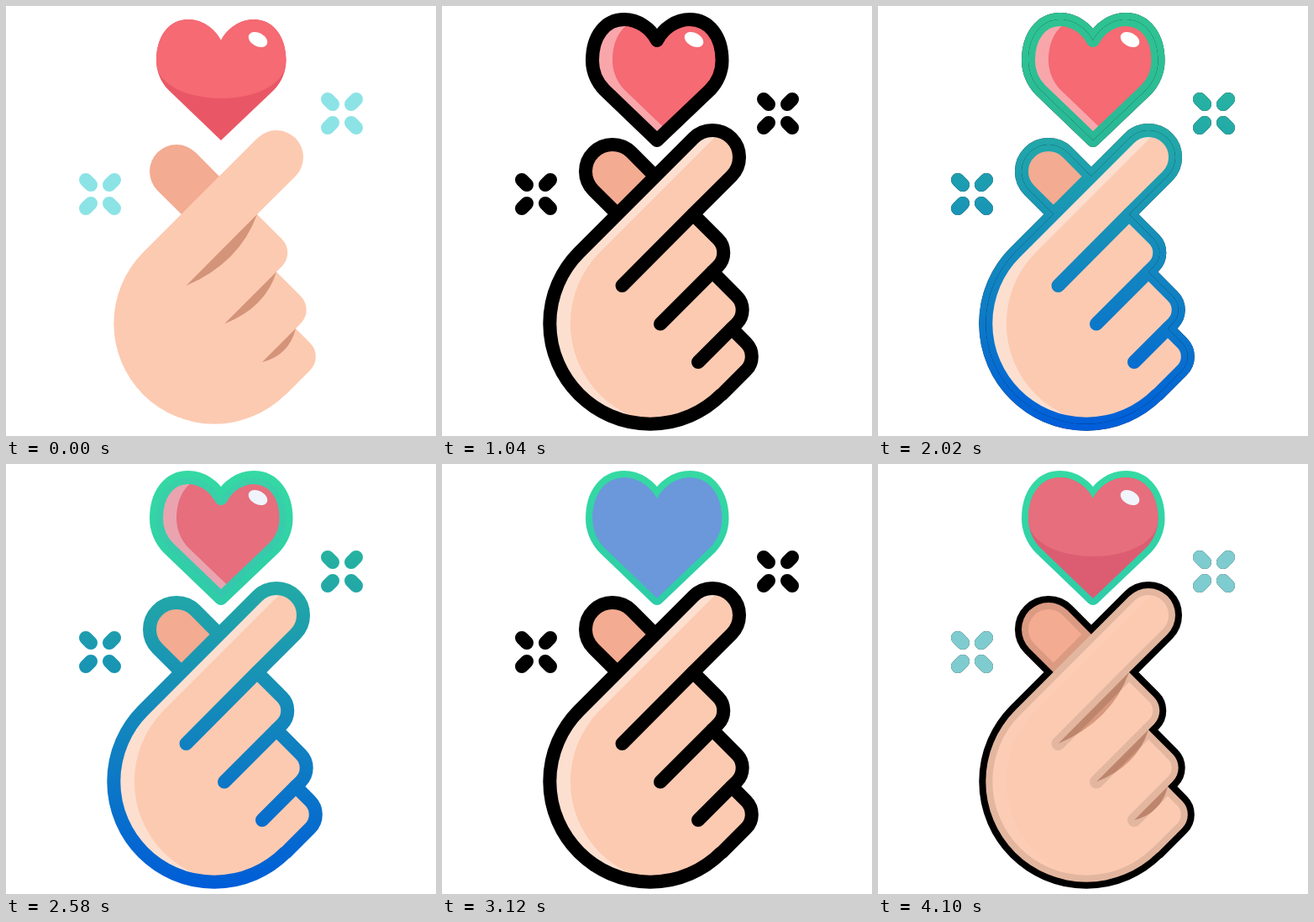
Animation of 512x512 px, one loop 4.16 s. Source, as an HTML page with a canvas:

```html
<!DOCTYPE html>
<html lang="en">
<head>
<meta charset="utf-8">
<title>Finger heart</title>
<style>
  html, body { margin: 0; width: 100%; height: 100%; overflow: hidden; background: #fff; }
  canvas { display: block; width: 512px; height: 512px; }
</style>
</head>
<body>
<canvas id="stage" width="512" height="512"></canvas>
<script>
const SIZE = 512, HOLD = 500, STEP = 60, STEPS = 9;
const PART = HOLD + STEP * STEPS;
const LINE = 16, SHINE = 24.5;
const PI = Math.PI;

const heart = new Path2D(
  'M256 160L193.5 100C184.5 91 179 78 179 65C179 36 194 16 217 16C233 16 248 26 256 41' +
  'C264 26 279 16 295 16C318 16 333.5 36 333.5 65C333.5 78 328 91 319 100Z');
const heartTop = new Path2D('M170 0H342V66H333.5C333.5 92 299 110 256 110C213 110 178.5 92 178.5 66H170Z');

// The lower end reaches under the hand.
const thumb = new Path2D();
thumb.arc(203, 197, 32, 0.75 * PI, 1.75 * PI);
thumb.lineTo(264, 213);
thumb.lineTo(219, 258);
thumb.closePath();

// Each folded finger: where its crease meets the edge, and its rounded corner.
const fingers = [
  { notch: [299, 248], corner: [344.8, 293.7], end: [214.5, 333], bend: [278, 306] },
  { notch: [322, 316.5], corner: [367.2, 361.8], end: [260, 378.5], bend: [309, 359] },
  { notch: [345, 384], corner: [378.3, 417.4], end: [305, 424], bend: [337, 416] }
];

const hand = new Path2D();
hand.arc(322, 180, 32, -0.75 * PI, 0.25 * PI);
fingers.forEach(({ notch, corner }, i) => {
  const next = i < 2 ? fingers[i + 1].notch : [332.9, 462.9];
  hand.lineTo(...notch);
  hand.arcTo(...corner, ...next, 23);
  hand.lineTo(...next);
});
hand.arc(248, 378, 119.7, 0.25 * PI, 1.25 * PI);
hand.closePath();

const creases = new Path2D(), shadows = new Path2D();
for (const { notch, end, bend } of fingers) {
  creases.moveTo(...notch);
  creases.lineTo(...end);
  shadows.moveTo(...end);
  shadows.lineTo(...notch);
  shadows.quadraticCurveTo(...bend, ...end);
}

const sparkles = new Path2D();
for (const [x, y] of [[400, 128], [112, 224]])
  for (const sx of [-1, 1])
    for (const sy of [-1, 1]) {
      sparkles.moveTo(x + 17 * sx, y + 17 * sy);
      sparkles.lineTo(x + 11 * sx, y + 11 * sy);
    }

const silhouette = new Path2D();
for (const shape of [heart, thumb, hand]) silhouette.addPath(shape);

function layer(draw) {
  const canvas = document.createElement('canvas');
  canvas.width = canvas.height = SIZE;
  const g = canvas.getContext('2d');
  g.lineWidth = LINE;
  g.lineCap = g.lineJoin = 'round';
  draw(g);
  return canvas;
}

function fill(g, path, color) {
  g.fillStyle = color;
  g.fill(path);
}

function stroke(g, color, ...paths) {
  g.strokeStyle = color;
  for (const path of paths) g.stroke(path);
}

function clipped(g, path, draw) {
  g.save();
  g.clip(path);
  draw();
  g.restore();
}

function drawHighlight(g) {
  g.fillStyle = '#fff';
  g.beginPath();
  g.ellipse(300, 40, 12, 8, 0.5, 0, 2 * PI);
  g.fill();
}

function drawShadedHeart(g) {
  fill(g, heart, '#e95766');
  clipped(g, heart, () => fill(g, heartTop, '#f56a73'));
  drawHighlight(g);
}

function drawShinyHeart(g) {
  fill(g, heart, '#f9a6ab');
  clipped(g, heart, () => {
    g.translate(24, 0);
    fill(g, heart, '#f56a73');
    g.fillRect(217, 16, 100, 50);
  });
  drawHighlight(g);
}

function drawFlatHand(g) {
  fill(g, thumb, '#f3ab91');
  fill(g, hand, '#fccab1');
  fill(g, shadows, '#d39479');
}

function drawShinyHand(g, ink) {
  fill(g, thumb, '#f3ab91');
  stroke(g, ink, thumb);
  fill(g, hand, '#fddfd0');
  clipped(g, hand, () => {
    g.translate(SHINE, 0);
    fill(g, hand, '#fccab1');
  });
  stroke(g, ink, hand, creases);
}

function vertical(g, y0, y1, from, to) {
  const gradient = g.createLinearGradient(0, y0, 0, y1);
  gradient.addColorStop(0, from);
  gradient.addColorStop(1, to);
  return gradient;
}

const black = () => '#000';
const ocean = g => vertical(g, 8, 506, 'rgb(54,222,165)', 'rgb(0,104,242)');
const mint = g => vertical(g, 8, 168, 'rgb(53,217,163)', 'rgb(46,204,168)');

// Everything inside the silhouette; the outer half of the outline is a separate rim.
function outlined(ink, heartInk) {
  return layer(g => {
    drawShinyHand(g, ink(g));
    if (heartInk) {
      drawShinyHeart(g);
      stroke(g, heartInk(g), heart);
    } else {
      fill(g, heart, '#6a98db');
    }
    g.globalCompositeOperation = 'destination-in';
    fill(g, silhouette, '#000');
    g.globalCompositeOperation = 'source-over';
    stroke(g, ink(g), sparkles);
  });
}

const rim = (ink, heartInk, width = LINE) => layer(g => {
  g.lineWidth = width;
  stroke(g, ink(g), thumb, hand);
  stroke(g, heartInk(g), heart);
});

const flat = layer(g => {
  drawFlatHand(g);
  drawShadedHeart(g);
  stroke(g, '#8ce3e6', sparkles);
});

const looks = [flat, outlined(black, black), outlined(ocean, mint), outlined(black)];
const rims = [null, rim(black, black), rim(ocean, mint), rim(black, mint)];
const hairline = rim(black, black, 1.6);

const stage = document.getElementById('stage').getContext('2d');

function put(image, alpha) {
  stage.globalAlpha = alpha;
  stage.drawImage(image, 0, 0);
}

function render(time) {
  const t = time % (PART * looks.length);
  const now = Math.floor(t / PART), next = (now + 1) % looks.length;
  const phase = t - now * PART;
  const step = phase < HOLD ? 0 : Math.min(STEPS, 1 + Math.floor((phase - HOLD) / STEP));
  const mix = step / (STEPS + 1);

  stage.globalAlpha = 1;
  stage.fillStyle = '#fff';
  stage.fillRect(0, 0, SIZE, SIZE);

  // A hairline darkens first; the full rim pops in past halfway and stays until the loop restarts.
  if (now === 0) {
    if (mix > 0.5) put(rims[1], 1);
    else put(hairline, mix * 2);
  } else {
    put(rims[now], 1);
    if (rims[next]) put(rims[next], mix);
  }
  put(looks[now], 1);
  put(looks[next], mix);
}

const start = performance.now();
function tick() {
  render(performance.now() - start);
  requestAnimationFrame(tick);
}
tick();
</script>
</body>
</html>
```
